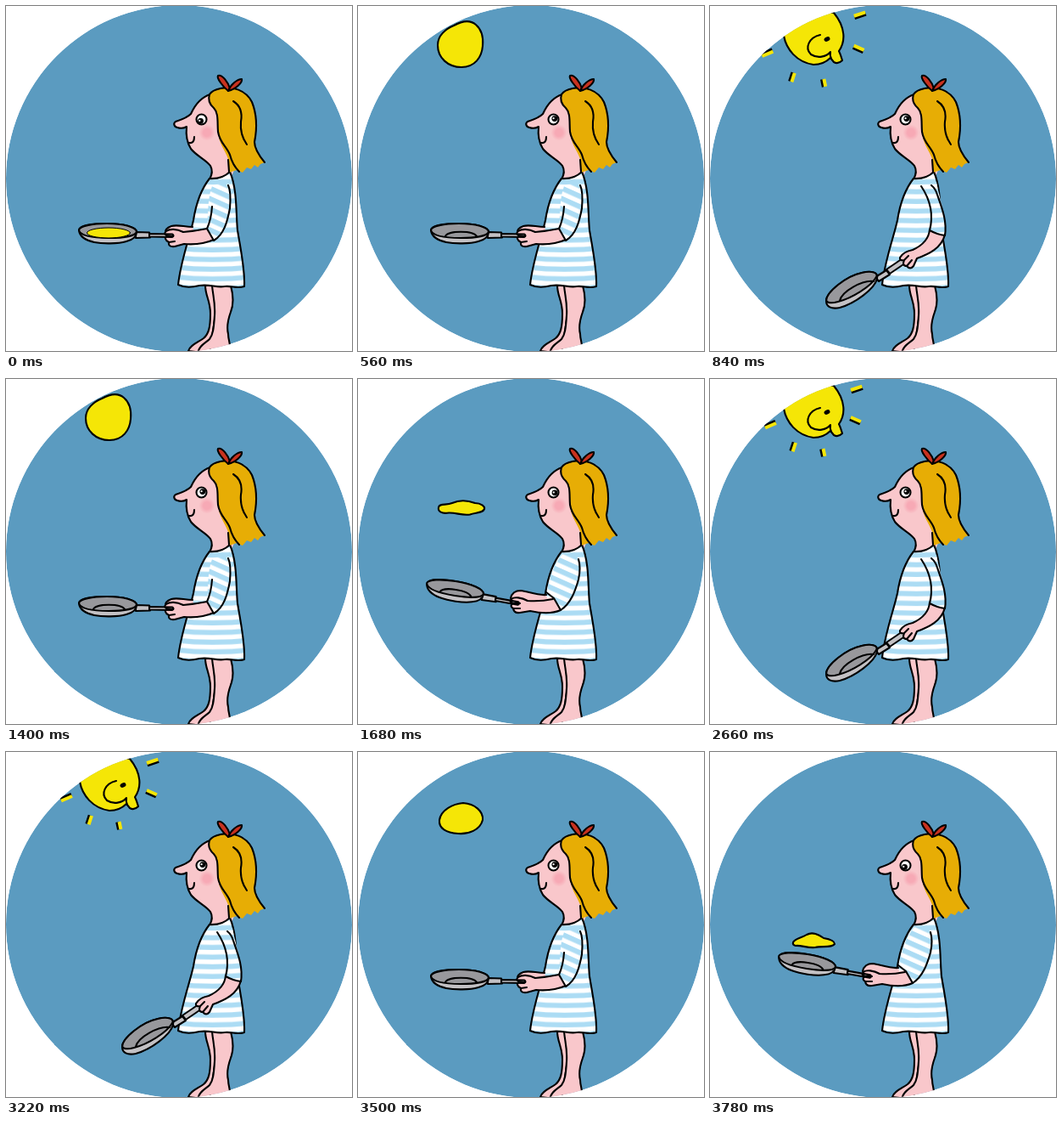
Write an HTML page that moves like this. It is 408 px wide and 406 px high and loops after 3920 ms.

```html
<!DOCTYPE html>
<html lang="en">
<head>
<meta charset="utf-8">
<title>Pancake sun</title>
<style>
  html, body { margin: 0; width: 100%; height: 100%; overflow: hidden; background: #fff; }
  svg { display: block; width: 100%; height: 100%; }
  .ink { fill: none; stroke: #000; stroke-width: 2.1; stroke-linecap: round; stroke-linejoin: round; }
  .skin { fill: #f9c7cb; }
  .hair { fill: #e7ad05; }
  .bow { fill: #c8321f; }
  .yolk { fill: #f5e606; }
  .steel { fill: #c3c1c4; }
  .dark { fill: #98989c; }
  .dress { fill: url(#stripes); }
  .sleeve { fill: url(#slant); }
  [data-part] { visibility: hidden; }
  [data-part].on { visibility: visible; }
</style>
</head>
<body>
<svg viewBox="0 0 408 406" preserveAspectRatio="none">
  <defs>
    <clipPath id="disc"><circle cx="204" cy="203" r="204"/></clipPath>
    <pattern id="stripes" x="200" y="213" width="90" height="11.4" patternUnits="userSpaceOnUse">
      <path d="M0 0H90V12H0z" fill="#fff"/>
      <path d="M0 3.200Q42 8 90 3.200" fill="none" stroke="#acdcf4" stroke-width="5.800"/>
    </pattern>
    <pattern id="slant" width="60" height="11.2" patternUnits="userSpaceOnUse" patternTransform="translate(240 210) rotate(24)">
      <path d="M0 0H60V12H0z" fill="#fff"/><path d="M0 1H60V7H0z" fill="#acdcf4"/>
    </pattern>
    <radialGradient id="blush">
      <stop offset=".45" stop-color="#f7a9b5"/><stop offset="1" stop-color="#f7a9b5" stop-opacity="0"/>
    </radialGradient>
    <g id="pan">
      <path class="ink steel" d="M153 266L169 266.500L170 272.500L153 273z"/>
      <path class="ink steel" d="M169 268L196 268.500Q199 270 196 272L169 271.500z"/>
      <path class="ink steel" d="M86 264C87 272 95 276 104 278C114 280 132 280 142 277C150 275 154 271 154 266C154 260 138 256 119 256C102 256 86 258 86 264z"/>
      <path class="ink dark" d="M86 264C86 259 102 256 119 256C138 256 154 260 154 266C152 271 137 273 121 273C101 273 88 270 86 264z"/>
      <path class="ink" d="M103 271C106 264 136 264 140 271"/>
    </g>
  </defs>

  <g clip-path="url(#disc)">
    <circle cx="204" cy="203" r="204" fill="#5b9bc0"/>

    <!-- legs -->
    <path class="ink skin" d="M235 329C235 341 241 347 241 362C241 378 239 386 233 391C226 396 217 399 215 406L240 409L252 329z"/>
    <path class="ink skin" d="M243 329C244 341 247 349 246 364C245 380 244 387 240 392C235 397 228 399 226 409L264 409C266 400 262 394 262 386C260 378 261 371 265 360C269 350 268 340 265 329z"/>

    <!-- face -->
    <path class="skin" d="M241 104C231 107 223 116 218 127C213 132 206 134 200 136C197 138 198 142 202 143Q208 145 213 142C212 151 213 160 218 168C224 176 236 181 241 188Q245 195 240 204L266 200L275 180L270 110z"/>
    <path class="ink" d="M241 104C231 107 223 116 218 127C213 132 206 134 200 136C197 138 198 142 202 143Q208 145 213 142C212 151 213 160 218 168C224 176 236 181 241 188Q245 195 240 204"/>
    <path class="ink" d="M216 161Q222 162 222 154"/>
    <circle cx="237" cy="149" r="9.500" fill="url(#blush)"/>
    <circle class="ink" cx="230.500" cy="133.500" r="6" style="fill:#fff"/>
    <g id="pupil"><circle r="3.400"/><circle cx="-1.200" cy="-.4" r="1.100" fill="#fff"/></g>

    <!-- dress -->
    <path class="ink dress" d="M240 203C229 217 224 233 221 252C217 271 206 300 203 328C211 332 220 331 228 329C241 327 248 332 258 330C267 329 272 333 281 330C282 311 277 288 273 264C271 245 273 216 264 195Q255 204 240 203z"/>

    <!-- hair -->
    <path class="hair" d="M240 104C245 97 259 94 271 97C287 101 295 118 295 139C294 153 292 162 297 172Q300 178 305 184L300 186L297 190L293 187L289 192L284 190L279 196L272 193L263 196L262 180C258 169 251 162 250 148C249 137 251 126 245 120Q237 113 240 104z"/>
    <path class="ink" d="M305 184C300 178 293 169 293 160C296 145 296 128 290 113C283 99 267 94 253 97Q243 99 240 104Q237 113 245 120C251 126 249 137 250 148C252 161 260 165 264 175Q267 187 275 195M262 181L263 195"/>
    <path class="ink" d="M252 110C261 115 262 126 261 136C261 147 266 157 271 165Q274 177 281 186M268 112C276 117 279 125 277 136C276 147 279 156 284 163" visibility="hidden"/>
    <path class="ink" d="M268 112C276 117 279 125 277 136C276 147 279 156 284 163"/>

    <!-- bow -->
    <path class="ink bow" d="M262 100C256 95 248 85 250 82C255 80 262 90 264 97z"/>
    <path class="ink bow" d="M262 100C265 92 273 86 278 86C279 90 271 98 262 100z"/>

    <!-- arms held level -->
    <g data-part="level">
      <path class="ink skin" d="M220 260C210 260 203 257 195 259Q187 262 188 267L204 270L222 267"/>
      <path class="skin" d="M238 262L209 266C201 262 193 262 189 265Q185 268 190 270L187 273Q187 277 192 278Q192 283 199 283L210 280C222 281 236 279 245 275z"/>
      <use href="#pan"/>
      <path class="ink" d="M237 262Q222 265 209 266C201 262 193 262 189 265Q185 268 190 270L197 271M190 270Q185 274 192 278Q191 284 199 283L210 280C222 281 236 279 245 275M192 278L199 277"/>
      <path class="sleeve" d="M243 212C237 228 239 246 237 262L245 276C258 270 263 253 264 236Q265 219 259 207z"/>
      <path class="ink" d="M243 236Q242 251 237 262L245 276C257 269 261 254 264 238C265 226 265 217 262 211"/>
    </g>

    <!-- arms tossing -->
    <g data-part="toss">
      <path class="ink skin" d="M222 254C212 255 200 250 192 249Q182 249 180 258L198 263L224 262"/>
      <path class="skin" d="M230 257L200 261C193 257 184 256 181 259Q177 262 183 264Q178 267 183 270Q184 276 191 275L203 273C217 276 230 276 239 271z"/>
      <use href="#pan" transform="translate(-5.500 -18) rotate(9 120 265)"/>
      <path class="ink" d="M230 259Q215 262 200 261C193 257 184 256 181 259Q177 262 183 264L191 264M183 264Q178 267 183 270Q184 276 191 275L203 273C217 276 230 276 239 272M183 270L191 270"/>
      <path class="sleeve" d="M241 206C230 219 225 237 223 251L231 257L239 272C252 264 257 250 260 236Q263 220 258 208z"/>
      <path class="ink" d="M222 251L231 258L239 272C251 264 256 250 260 236Q263 222 260 212"/>
    </g>

    <!-- arm lowered -->
    <g data-part="low">
      <path class="ink steel" d="M195 319L208 311L212 316L199 324z"/>
      <path class="ink steel" d="M208 310L236 291L240 296L212 315z"/>
      <path class="ink steel" d="M137 347C137 337 160 318 179 314C191 311 199 314 197 321C194 333 171 350 153 355C143 357 137 354 137 347z"/>
      <path class="ink dark" d="M137 347C137 337 160 318 179 314C191 311 199 314 196 319C190 330 167 344 151 348Q140 351 137 347z"/>
      <path class="ink" d="M153 347C155 336 180 322 193 324"/>
      <path class="skin" d="M259 263C258 275 250 282 239 287Q228 289 224 296Q223 300 229 299Q226 306 232 306Q235 311 240 306L244 297C258 292 273 285 277 269z"/>
      <path class="ink" d="M259 263C258 275 250 282 239 287Q228 289 224 296Q223 300 229 299L234 294M229 299Q226 306 232 306L238 299M232 306Q236 311 240 306L244 297C258 292 273 285 277 269"/>
      <path class="dress" d="M249 212C259 227 264 245 259 264Q268 269 277 270C280 251 271 229 267 207z"/>
      <path class="ink" d="M249 212C259 227 264 245 259 264Q268 269 277 270C280 252 272 234 268 222Q266 215 261 211"/>
    </g>

    <!-- pancake and sun -->
    <ellipse data-part="fried" class="ink yolk" cx="121" cy="267" rx="25.500" ry="6" style="stroke-width:1"/>
    <path data-part="hop" class="ink yolk" d="M98 224C100 219 108 219 114 215C121 211 128 215 134 219C140 220 147 222 147 226C143 231 132 228 124 230C115 231 107 227 101 228Q97 227 98 224z"/>
    <path data-part="fly" class="ink yolk" d="M95 151C96 146 104 149 111 146C120 142 130 143 138 146C145 146 150 150 149 153C147 158 139 157 132 159.500C122 161 116 157 107 157.500C99 159 94 156 95 151z"/>
    <path data-part="rise" class="ink yolk" d="M96 80C98 68 112 61 124 60C138 61 148 70 147 80C144 92 130 97 118 96C104 95 95 90 96 80z"/>
    <path data-part="ball" class="ink yolk" d="M94 46C94 35 103 27 113 23C122 18 132 16 139 22C146 28 148 37 147 47C146 60 138 72 122 72C106 72 94 61 94 46z"/>
    <g data-part="sun">
      <path class="ink yolk" d="M87 35C90 51 102 66 122 69Q134 69 142 61L146 66Q151 69 156 64Q154 57 152 53C160 42 160 25 146 8L110 0z"/>
      <path class="ink" d="M130 34C117 37 111 49 119 57C127 62 137 60 142 54Q141 58 143 62"/>
      <ellipse cx="138" cy="39" rx="3.600" ry="2.600" transform="rotate(-25 138 39)"/>
      <g id="rays" fill="none" stroke-width="4"></g>
    </g>
  </g>
</svg>
<script>
  const STEP = 140;
  const poses = [
    ['level', 'fried', 'down'],
    ['toss', 'hop', 'down'],
    ['toss', 'fly', 'ahead'],
    ['level', 'rise', 'up'],
    ['level', 'ball', 'up'],
    ['low', 'sun', 'up', 0],
    ['low', 'sun', 'up', 4]
  ];
  // Up, a pause at the top, and back down
  const order = [0, 1, 2, 3, 4, 5, 6, 6, 6, 5, 4, 3, 2, 1];
  const gaze = { down: [229.5, 135.3], ahead: [232, 133.8], up: [231.8, 132.6] };

  // Ray start, direction in degrees and length
  const rays = [[166, 13, -18, 14], [166, 45, 24, 13], [133.5, 82, 78, 9], [101, 75, 108, 11], [78, 52, 157, 14]];
  const parts = document.querySelectorAll('[data-part]');
  const pupil = document.getElementById('pupil');
  const rayBox = document.getElementById('rays');

  function drawRays(push) {
    rayBox.innerHTML = rays.map(([x, y, deg, len]) => {
      const d = `M${push} 0h${len}`;
      return `<g transform="translate(${x} ${y}) rotate(${deg})">` +
        `<path d="${d}" stroke="#000" transform="translate(0 2.4)"/><path d="${d}" stroke="#f5e606"/></g>`;
    }).join('');
  }

  let shown = -1;
  function frame() {
    const index = order[Math.floor(performance.now() / STEP) % order.length];
    if (index !== shown) {
      shown = index;
      const [arms, cake, look, push = 0] = poses[index];
      parts.forEach(p => p.classList.toggle('on', p.dataset.part === arms || p.dataset.part === cake));
      pupil.setAttribute('transform', `translate(${gaze[look]})`);
      drawRays(push);
    }
    requestAnimationFrame(frame);
  }
  frame();
</script>
</body>
</html>
```
